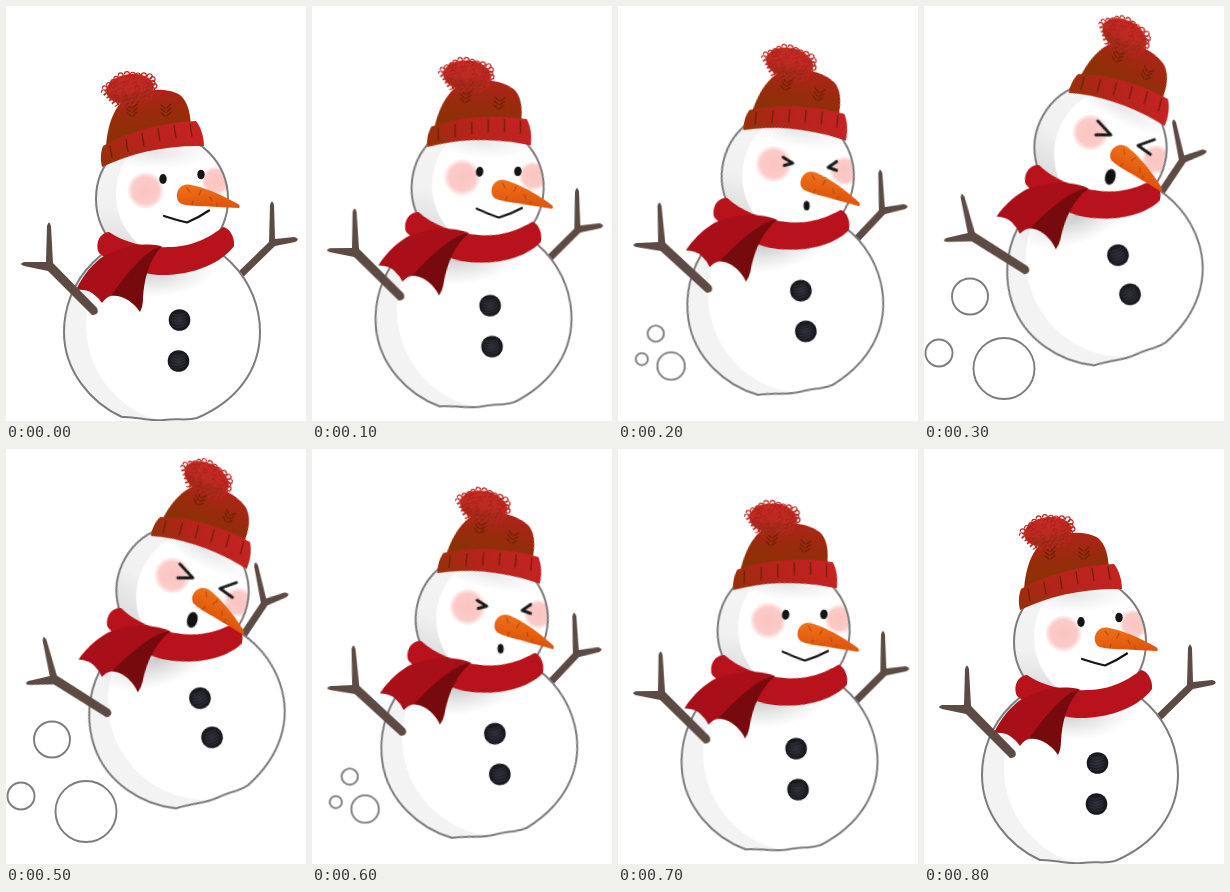
These frames come from a looping animation (300 by 415 pixels, 0.9 s). An HTML page:

```html
<!DOCTYPE html>
<html lang="en">
<head>
<meta charset="utf-8">
<title>Sneezing snowman</title>
<style>
  html, body { margin: 0; width: 100%; height: 100%; overflow: hidden; background: #fff; }
  svg { display: block; width: 100vw; height: 100vh; }
  .line { fill: none; stroke-linecap: round; stroke-linejoin: round; }
  .ink { stroke: #151515; stroke-width: 3; vector-effect: non-scaling-stroke; }
  .outline { fill: none; stroke: #7c7c7c; stroke-width: 2; }
  .wood { fill: #5c4a44; }
  .bubble { fill: #fff; stroke: #7c7c7c; stroke-width: 1.9; vector-effect: non-scaling-stroke; }
</style>
</head>
<body>
<svg viewBox="0 0 300 415">
  <defs>
    <radialGradient id="blush">
      <stop offset="0" stop-color="#fac4c0"/><stop offset=".75" stop-color="#fbcbc8"/>
      <stop offset="1" stop-color="#fbd8d5" stop-opacity=".3"/>
    </radialGradient>
    <radialGradient id="shadow">
      <stop offset="0" stop-color="#999" stop-opacity=".5"/><stop offset="1" stop-color="#aaa" stop-opacity="0"/>
    </radialGradient>
    <radialGradient id="coal">
      <stop offset="0" stop-color="#2c2d35"/><stop offset="1" stop-color="#15151b"/>
    </radialGradient>
    <linearGradient id="headShade" x1=".5" y1="0" x2=".4" y2="1">
      <stop offset="0" stop-color="#f6f6f6"/><stop offset=".6" stop-color="#f1f1f1"/><stop offset="1" stop-color="#d6d6d6"/>
    </linearGradient>
    <linearGradient id="carrot" x1="0" y1="0" x2=".2" y2="1">
      <stop offset="0" stop-color="#ee7319"/><stop offset="1" stop-color="#e0560c"/>
    </linearGradient>
    <linearGradient id="dome" x1="0" y1="0" x2=".15" y2="1">
      <stop offset="0" stop-color="#b3221c"/><stop offset=".5" stop-color="#982b0c"/><stop offset="1" stop-color="#853403"/>
    </linearGradient>
    <linearGradient id="brim" x1="0" y1=".7" x2="1" y2=".3">
      <stop offset="0" stop-color="#9a2f0b"/><stop offset=".35" stop-color="#b3241a"/><stop offset="1" stop-color="#c52322"/>
    </linearGradient>
    <linearGradient id="fluff" x1="0" y1="0" x2="0" y2="1">
      <stop offset="0" stop-color="#cb2926"/><stop offset=".6" stop-color="#b92a20"/><stop offset="1" stop-color="#8c2c10"/>
    </linearGradient>
    <path id="bodyShape" d="M116 411C85 397 58 365 58 326A98 98 0 0 1 254 326C254 364 231 395 191 412C180 415 172 412 158 414C142 416 130 410 116 411Z"/>
    <circle id="headShape" cx="156" cy="193" r="66"/>
    <clipPath id="bodyClip"><use href="#bodyShape"/></clipPath>
    <clipPath id="headClip"><use href="#headShape"/></clipPath>
  </defs>

  <!-- data-move: dx, dy and turn at full sneeze; data-bend: an easing exponent for each -->
  <g class="part sneezing" data-pivot="31 358" data-move="16 -25 0" data-grow="0 1">
    <circle class="bubble" cx="30" cy="315.500" r="18"/>
    <circle class="bubble" cx="-1" cy="372" r="13.500"/>
    <circle class="bubble" cx="64" cy="387.500" r="30.500"/>
  </g>

  <g class="part wood" data-pivot="266 237" data-move="-8 -83 -12" data-bend="1.7 1.2 2">
    <path d="M264 199Q266 192 268 199L269 233L288 231Q295 233 289 236L269 240L232 276L227 271L263 236Z"/>
  </g>

  <g class="part" data-pivot="156 327" data-move="25.500 -60 -18.500">
    <use href="#bodyShape" fill="#f3f3f3"/>
    <g clip-path="url(#bodyClip)">
      <circle cx="179" cy="319" r="99" fill="#fff"/>
      <ellipse cx="146" cy="264" rx="62" ry="27" fill="url(#shadow)"/>
    </g>
    <use href="#bodyShape" class="outline"/>
    <circle cx="173.500" cy="314" r="10.800" fill="url(#coal)"/>
    <circle cx="172.500" cy="355" r="10.800" fill="url(#coal)"/>
    <path id="weave" class="line" stroke="#484a55" stroke-width=".6" opacity=".6"/>
  </g>

  <g class="part" data-pivot="156 193" data-move="20.500 -51 30" data-bend=".5 1 1">
    <use href="#headShape" fill="url(#headShade)"/>
    <g clip-path="url(#headClip)">
      <circle cx="177" cy="188" r="67" fill="#fff"/>
      <ellipse cx="150" cy="146" rx="58" ry="17" fill="url(#shadow)" opacity=".5"/>
      <circle cx="139.500" cy="184.500" r="18" fill="url(#blush)"/>
      <circle cx="210" cy="175" r="14.500" fill="url(#blush)"/>
    </g>
    <use href="#headShape" class="outline"/>
  </g>

  <g class="part" data-pivot="160.500 233" data-move="10 -57 10" data-bend="1 1 .2">
    <path fill="#b8121c" d="M103 226C120 238 145 242 165 241C190 240 205 230 217 221C224 222 229 232 228 240C215 258 185 270 152 269C128 267 104 256 93 247C89 238 93 227 103 226Z"/>
    <path fill="#a90f18" d="M155 240C130 235 112 243 98 250C88 256 76 270 70 284Q80 283 86 287Q92 291 96 297Q100 291 105 290C125 275 142 260 155 240Z"/>
    <path fill="#760a0c" d="M156 240C138 244 115 275 105 290C115 288 128 296 134 306Q137 300 137 292C138 275 142 255 156 240Z"/>
  </g>

  <g class="part wood" data-pivot="44 262" data-move="5 -30 -13" data-bend="3 .5 2">
    <path d="M41 220Q43 213 45 220L47 257L91 302Q94 309 86 309L42 265L18 260Q12 258 18 256L40 256Z"/>
  </g>

  <g class="part" data-pivot="146 150" data-move="46 -47.500 31" data-bend=".55 1 .7" data-skew="7">
    <path fill="url(#dome)" d="M100 142C101 118 109 100 120 92C135 82 162 81 174 89C182 96 184 106 185 120Z"/>
    <path fill="url(#brim)" d="M96 161C94 152 95 145 97 140C125 124 160 116 190 115C195 121 198 131 198 140C160 139 125 147 96 161Z"/>
    <path id="knit" class="line" stroke="#6d2106" stroke-width="1.300"/>
    <ellipse cx="124" cy="83" rx="24" ry="15" transform="rotate(-8 124 83)" fill="url(#fluff)"/>
    <path id="curls" class="line" stroke="#b9261e" stroke-width="1.200"/>
    <path id="innerCurls" class="line" stroke="#8f2016" stroke-width=".8" opacity=".5"/>
  </g>

  <g class="part" data-pivot="176 171" data-move="24.700 -40 28" data-bend=".55 1.350 1">
    <g class="part calm">
      <ellipse cx="157" cy="173" rx="3.700" ry="5" fill="#151515"/>
      <ellipse cx="195" cy="168.500" rx="3.700" ry="4.800" fill="#151515"/>
      <path class="line" stroke="#151515" stroke-width="2.200" d="M158 210Q170 214 181 216.500Q192 212 203 204.500"/>
    </g>
    <g class="part sneezing" data-pivot="154 173" data-grow=".25 1">
      <path class="line ink" transform="rotate(-24 154 173)" d="M147 166L161 179L146 180"/>
    </g>
    <g class="part sneezing" data-pivot="199 169" data-grow=".25 1">
      <path class="line ink" transform="rotate(-24 199 169)" d="M207 162L191 169L204 177"/>
    </g>
    <g class="part sneezing" data-pivot="182 213" data-grow=".25 1">
      <ellipse cx="182" cy="213" rx="5.200" ry="8" transform="rotate(-14 182 213)" fill="#111"/>
    </g>
    <path fill="url(#carrot)" d="M183 178.500C172 177 167 191 174 197C179 201 205 200 233 202Q235 200 232 198C216 189 198 181 183 178.500Z"/>
    <path class="line" stroke="#b94a0c" stroke-width="1.200" d="M181 182L184 186M195 184L193 189M186 199L187 195M204 191L206 195M211 200L211 197"/>
  </g>
</svg>

<script>
const STEP = 100;
const RISE = [0, 0.22, 0.45, 1, 1.25];
const PROGRESS = [...RISE, ...RISE.slice(0, -1).reverse()];
const SNEEZE_FROM = 0.4;

const numbers = (text, fallback) => (text ?? fallback).split(' ').map(Number);

function poseOf(part, p) {
  const { move, bend, grow, skew } = part.dataset;
  const power = numbers(bend, '1 1 1');
  const [x, y, turn] = numbers(move, '0 0 0').map((v, i) => v * p ** power[i]);
  const [from, to] = numbers(grow, '1 1');
  const hidden = part.classList.contains(p < SNEEZE_FROM ? 'sneezing' : 'calm');
  return {
    opacity: hidden ? 0 : 1,
    transform: `translate(${x}px, ${y}px) rotate(${turn}deg) skewX(${(skew ?? 0) * p}deg) scale(${from + (to - from) * p})`
  };
}

function animatePart(part) {
  const [x, y] = numbers(part.dataset.pivot, '0 0');
  part.style.transformOrigin = `${x}px ${y}px`;
  const frames = [...PROGRESS, 0].map((p, i) => ({
    offset: i / PROGRESS.length,
    easing: 'steps(1, end)',
    ...poseOf(part, p)
  }));
  return part.animate(frames, { duration: STEP * PROGRESS.length, iterations: Infinity });
}

const draw = (id, d) => document.getElementById(id).setAttribute('d', d);
const repeat = (count, make) => Array.from({ length: count }, (_, i) => make(i)).join('');
const curl = (x, y, r) => `M${x - r} ${y}a${r} ${r} 0 1 1 ${r} ${r}`;

// Curls sit on a tilted ellipse at a share of its radius.
function fluffCurl(i, count, reach, r) {
  const a = i / count * Math.PI * 2;
  return curl(124 + 25 * reach * Math.cos(a), 83 + reach * (15 * Math.sin(a) - 3 * Math.cos(a)), r);
}

draw('curls', repeat(26, i => fluffCurl(i, 26, 0.98 + 0.08 * Math.sin(i * 5), 2.4)));
draw('innerCurls', repeat(26, i => fluffCurl(i, 26, 0.3 + 0.5 * Math.abs(Math.sin(i * 7)), 2.2)));
draw('weave', repeat(10, i => `M${166 - (i > 4)} ${308 + i % 5 * 3 + (i > 4 ? 41 : 0)}q7 3 14 -1`));
draw('knit',
  repeat(6, i => {
    const x = i < 3 ? 126 : 160, y = 99 + i % 3 * 4;
    return `M${x - 5} ${y}l4 3M${x + 5} ${y - 1}l-4 4`;
  }) +
  repeat(6, i => `M${104 + i * 16} ${140 - 22 * Math.sin(i * 0.3)}l2 12`));

const start = document.timeline.currentTime ?? 0;
for (const part of document.querySelectorAll('.part')) animatePart(part).startTime = start;
</script>
</body>
</html>
```
